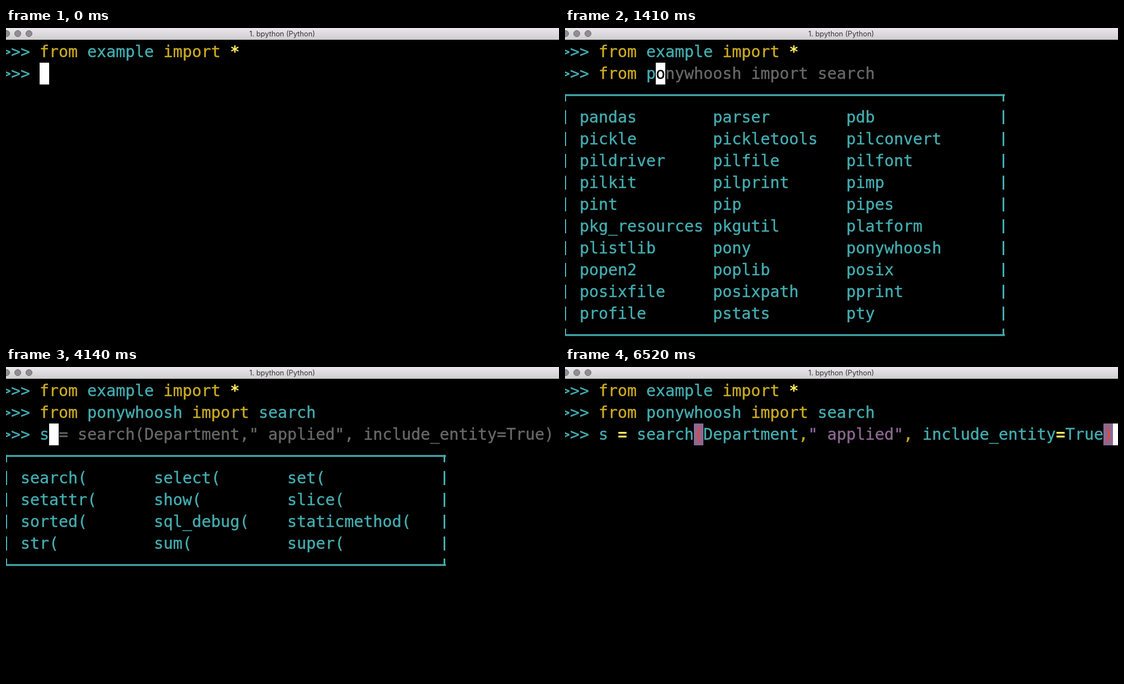
An HTML page that plays this animation: 987 px wide and 556 px high, repeating every 8 s.

```html
<!DOCTYPE html>
<html lang="en">
<head>
<meta charset="utf-8">
<title>bpython session</title>
<style>
  html, body { margin: 0; width: 100%; height: 100%; overflow: hidden; background: #000; }
  svg { display: block; width: 987px; height: 556px; }
  #screen text {
    font: 28.24px "DejaVu Sans Mono", "Noto Sans Mono", monospace;
    white-space: pre; fill: currentColor; stroke: currentColor; stroke-width: .4px;
  }
  #title { font: 12.75px Inter, "Open Sans", sans-serif; fill: #343434; }
  .name { color: #45adb1; }
  .key { color: #cbab23; }
  .hint { color: #686868; }
  .str { color: #8c6992; }
  .under { color: #000; }
  #screen .op { color: #ffee62; font-weight: 700; stroke: none; }
  .paren { color: #f04434; }
</style>
</head>
<body>
<svg viewBox="0 0 987 556">
  <defs>
    <linearGradient id="bar" x2="0" y2="1">
      <stop offset="0" stop-color="#e9e7e9"/>
      <stop offset="1" stop-color="#cfcdcf"/>
    </linearGradient>
  </defs>
  <rect width="987" height="556"/>
  <g id="screen"></g>
  <rect width="987" height="21" fill="url(#bar)"/>
  <g fill="#8f8e91" stroke="#6d6c6f">
    <circle cx="1" cy="10" r="5.5"/>
    <circle cx="21" cy="10" r="5.5"/>
    <circle cx="41" cy="10" r="5.5"/>
  </g>
  <text id="title" x="493" y="15" text-anchor="middle">1. bpython (Python)</text>
</svg>
<script>
const LOOP = 8000, CELL = 17, LINE = 39, LEFT = -8, TOP = 23, PROMPT = 4;
const screen = document.getElementById('screen');

const colX = col => LEFT + col * CELL;
const rowY = row => TOP + row * LINE;
const rect = (x, y, w, h, fill) =>
  `<rect x="${x}" y="${y}" width="${w}" height="${h}" fill="${fill}"/>`;
const cell = (row, col, fill) => rect(colX(col), rowY(row), CELL, LINE, fill);
const text = (row, col, str, cls) =>
  `<text class="${cls}" x="${colX(col)}" y="${rowY(row) + 29}">${str}</text>`;

// Draws [class, string] tokens after the prompt.
function line(row, tokens) {
  let out = text(row, 0, '&gt;&gt;&gt;', 'name'), col = PROMPT;
  for (const [cls, str] of tokens) {
    if (cls === 'paren') out += cell(row, col, '#8c6992');
    out += text(row, col, str, cls);
    col += str.length;
  }
  return out;
}

// Typed tokens, the block cursor, then the suggested rest of the line.
function input(row, tokens, hint = '') {
  const end = PROMPT + tokens.reduce((n, t) => n + t[1].length, 0);
  return line(row, tokens) + cell(row, end, '#fff') +
    text(row, end, hint.slice(0, 1), 'under') +
    text(row, end + 1, hint.slice(1), 'hint');
}

function menu(row, list) {
  const words = list.split(' ');
  const step = Math.max(...words.map(w => w.length)) + 1;
  const rows = Math.ceil(words.length / 3);
  const color = '#45adb1';
  const sides = (y, h) => rect(0, y, 2, h, color) + rect(781, y, 3, h, color);
  const edge = y => rect(0, y, 785, 3.2, color);
  const top = rowY(row) + 17.4, bottom = rowY(row + rows + 1) + 17.4;
  let out = edge(top) + sides(top, 13) + edge(bottom) + sides(bottom - 10, 12);
  for (let r = 1; r <= rows; r++) out += sides(rowY(row + r) + 7, 25);
  words.forEach((word, i) => {
    out += text(row + 1 + Math.floor(i / 3), 2 + i % 3 * step, word, 'name');
  });
  return out;
}

const first = [['key', 'from '], ['name', 'example '], ['key', 'import '], ['op', '*']];
const second = [['key', 'from '], ['name', 'ponywhoosh '], ['key', 'import '], ['name', 'search']];
const third = [
  ['name', 's '], ['op', '= '], ['name', 'search'], ['paren', '('], ['name', 'Department'],
  ['key', ','], ['str', '" applied"'], ['key', ', '], ['name', 'include_entity'],
  ['op', '='], ['name', 'True'], ['paren', ')']
];
const plain = tokens => tokens.map(t => t[1]).join('');

const fMenu = menu(2, 'file( filter( finally float( flush( for format( from frozenset(');
const frMenu = menu(2, 'from frozenset(');
const pMenu = menu(2, 'pandas parser pdb pickle pickletools pilconvert pildriver pilfile pilfont ' +
  'pilkit pilprint pimp pint pip pipes pkg_resources pkgutil platform plistlib pony ponywhoosh ' +
  'popen2 poplib posix posixfile posixpath pprint profile pstats pty');
const sMenu = menu(3, 'search( select( set( setattr( show( slice( sorted( sql_debug( ' +
  'staticmethod( str( sum( super(');

const typing = (n, cls) => input(1, [[cls, 'from '.slice(0, n)]], plain(first).slice(n));
const typedS = line(1, second) + input(2, [['name', 's']], plain(third).slice(1)) + sMenu;
const filled = line(1, second) + input(2, third);

const steps = [
  [0, input(1, [])],
  [500, typing(1, 'name') + fMenu],
  [710, typing(2, 'name') + frMenu],
  [850, typing(3, 'name') + frMenu],
  [990, typing(4, 'key')],
  [1130, typing(5, 'key')],
  [1410, input(1, [['key', 'from '], ['name', 'p']], plain(second).slice(6)) + pMenu],
  [2530, input(1, second)],
  [3160, line(1, second) + input(2, [])],
  [4140, typedS],
  [4490, filled],
  [5190, typedS],
  [6520, filled]
];

let shown;
function draw(ms) {
  const step = steps.findLast(s => s[0] <= ms);
  if (step === shown) return;
  shown = step;
  screen.innerHTML = line(0, first) + step[1];
}

const start = performance.now();
function tick() {
  draw((performance.now() - start) % LOOP);
  requestAnimationFrame(tick);
}
tick();
</script>
</body>
</html>
```
